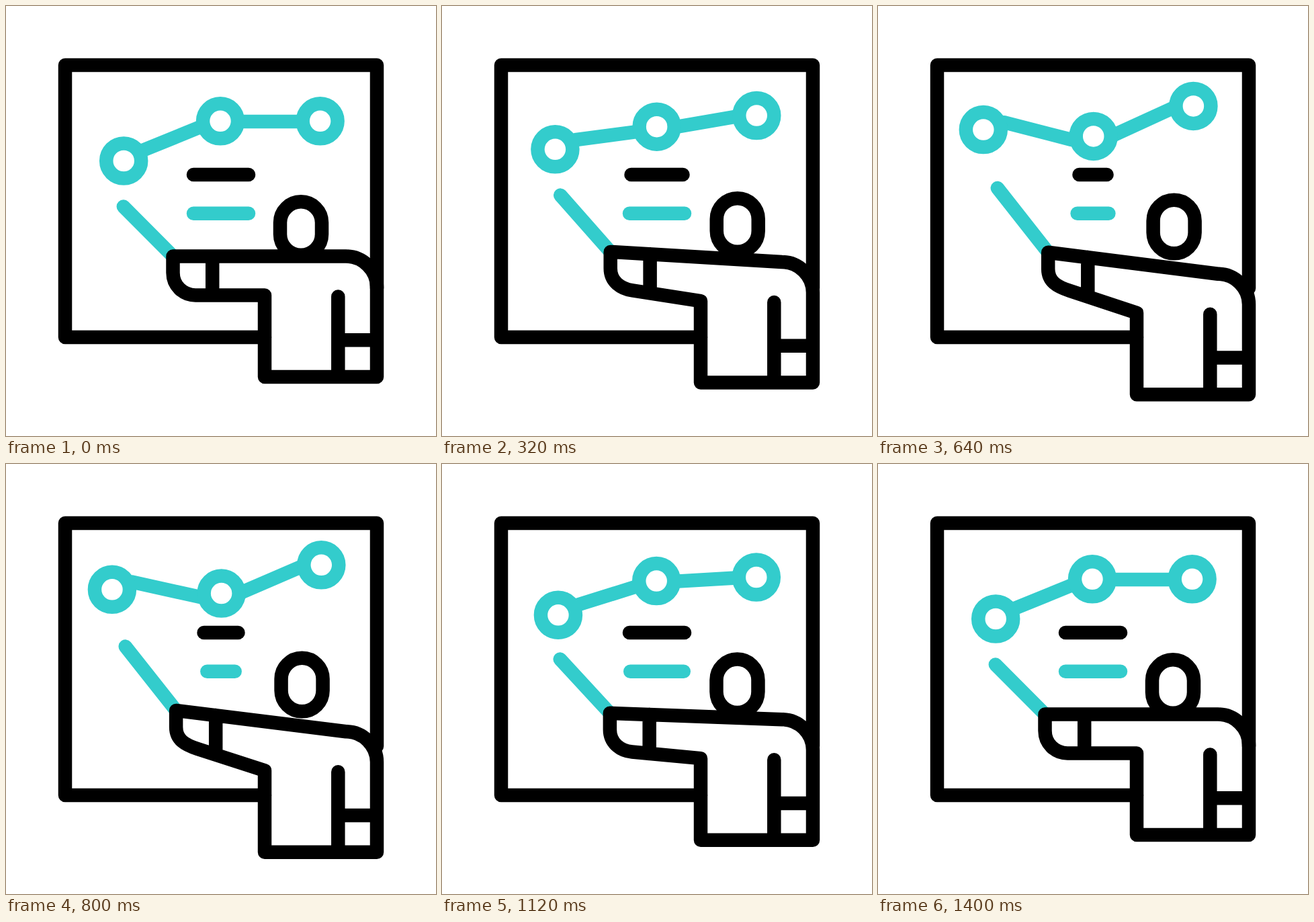
Animation, 640 px wide and 640 px high, one loop 1640 ms. Source, as an HTML page:

```html
<!DOCTYPE html>
<html lang="en">
<head>
<meta charset="utf-8">
<title>Presentation</title>
<style>
  html, body { margin: 0; width: 100%; height: 100%; overflow: hidden; background: #fff; }
  svg { display: block; width: 100%; height: 100%; }
  svg * { fill: none; stroke-width: 20.5; stroke-linecap: round; stroke-linejoin: round; }
  .ink { stroke: #000; }
  .teal { stroke: #3cc; }
</style>
</head>
<body>
<svg viewBox="0 0 640 640">
  <path class="ink" d="M385 493H88V88H552V420"/>
  <g class="teal">
    <path id="links"/>
    <circle id="dot1" r="26"/>
    <circle id="dot2" r="26"/>
    <circle id="dot3" r="26"/>
    <path id="bar2"/>
    <path id="pointer"/>
  </g>
  <g class="ink">
    <path id="bar1"/>
    <rect id="head" x="408" y="291.3" width="62" height="79.5" rx="31"/>
    <path id="body"/>
  </g>
</svg>
<script>
const LOOP = 1640, STEP = 40;
const el = id => document.getElementById(id);

// cubic-bezier(.5, 0, .5, 1)
function ease(x) {
  if (x <= 0) return 0;
  if (x >= 1) return 1;
  let lo = 0, hi = 1;
  for (let i = 0; i < 24; i++) {
    const s = (lo + hi) / 2;
    if (1.5 * s * (1 - s) + s * s * s < x) lo = s; else hi = s;
  }
  return lo * lo * (3 - 2 * lo);
}

// rises from a to b, falls back from c to d
const pulse = (t, a, b, c, d) =>
  t < c ? ease((t - a) / (b - a)) : 1 - ease((t - c) / (d - c));

const setPath = (id, d) => el(id).setAttribute('d', d);

function setDot(id, x, y) {
  el(id).setAttribute('cx', x);
  el(id).setAttribute('cy', y);
}

function setBar(id, y, k) {
  const half = 41 - 20.5 * k;
  setPath(id, `M${320 - half} ${y}H${320 + half}`);
}

function draw(t) {
  const g = pulse(t, 60, 660, 684, 1279);
  setDot('dot1', 175.2 - 18.4 * g, 230.5 - 46.5 * g);
  setDot('dot2', 319 + 1.7 * g, 171.3 + 22.7 * g);
  setDot('dot3', 467.6 + 1.8 * g, 171.3 - 22.4 * g);
  setPath('links',
    `M${204.5 - 17 * g} ${214.6 - 41.5 * g}L288 ${180.5 + 18.5 * g}` +
    `M352 ${172 + 19.7 * g}L${437 + 1.5 * g} ${172 - 20 * g}`);

  setBar('bar1', 251, pulse(t, 202, 642, 642, 1082));
  setBar('bar2', 308.7, pulse(t, 325, 765, 765, 1205));

  // the body sinks while the arm and head lift
  const sink = 26.3 * pulse(t, 84, 662, 720, 1375);
  const lift = pulse(t, 77, 577, 720, 1375);
  const at = (x, y, dx = 0, dy = 0) => `${x + dx * lift} ${y + sink - dy * lift} `;
  const hand = at(248.5, 372.5, 4.7, 32);

  setPath('pointer', 'M' + at(174.8, 298.5, 3, 53.8) + 'L' + hand);
  el('head').setAttribute('transform',
    `translate(${1.6 * lift} ${sink - 28.8 * lift})`);
  setPath('body',
    'M' + hand + 'L' + at(506, 372.5) +
    'C' + at(531, 372.5) + at(552, 393) + at(552, 418) +
    'L' + at(552, 552) + 'L' + at(385, 552) + 'L' + at(385, 430.5) +
    'L' + at(282, 430.5, 3.2, 33) +
    'C' + at(263.5, 430.5, 3.2, 39) + at(248.5, 416, 4.7, 32) + at(248.5, 397, 4.7, 32) + 'Z' +
    'M' + at(307.2, 372.5, 5.1, 24.7) + 'L' + at(307.2, 430.5, 5.1, 24.7) +
    'M' + at(494.3, 432.5) + 'L' + at(494.3, 552) +
    'M' + at(494.3, 497.3) + 'L' + at(552, 497.3));
}

const start = performance.now();
function tick() {
  const t = (performance.now() - start) % LOOP;
  draw(Math.floor(t / STEP) * STEP);
  requestAnimationFrame(tick);
}
tick();
</script>
</body>
</html>
```
